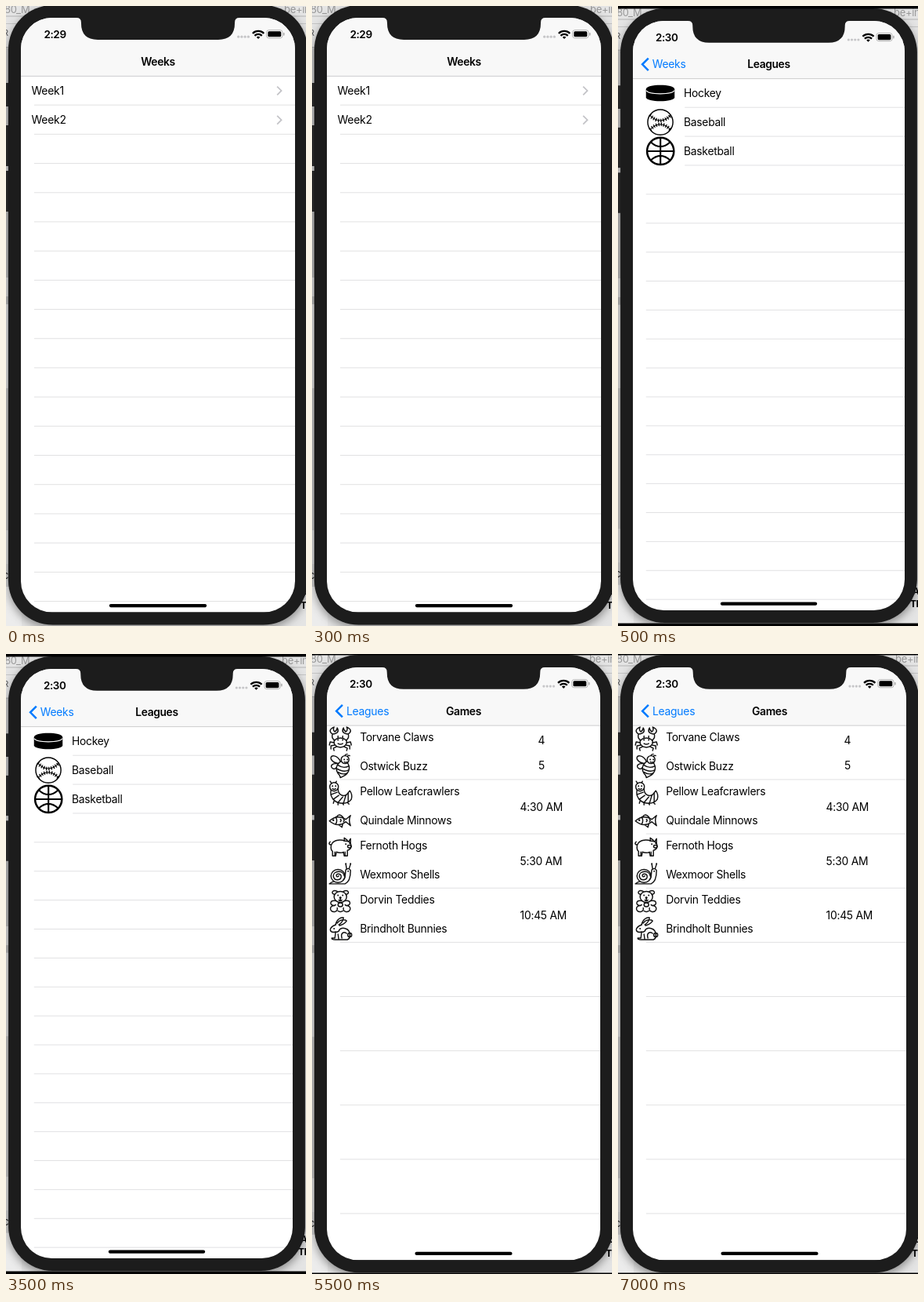
Write an HTML page that moves like this. It is 383x790 px and loops after 8 s.

```html
<!DOCTYPE html>
<html lang="en">
<head>
<meta charset="utf-8">
<title>Weekly games</title>
<style>
  html, body { margin: 0; width: 100%; height: 100%; overflow: hidden; background: #000; }
  svg { display: block; width: 100%; height: 100%; }
  text { font-family: Inter, "Liberation Sans", sans-serif; font-size: 16.5px; letter-spacing: -.3px; }
  .title { font-weight: 600; letter-spacing: -.45px; }
  .icon { fill: none; stroke: #111; stroke-width: 1.45; stroke-linecap: round; stroke-linejoin: round; }
  .icon .dot { fill: #111; stroke: none; }
</style>
</head>
<body>
<svg id="stage" viewBox="0 0 383 790" preserveAspectRatio="none"></svg>
<script>
const LOOP = 8000;
const W = 414, H = 896, NAV = 88, BEZEL = 19;
const BLUE = '#007aff';

const rect = (x, y, w, h, fill, r = 0) =>
  `<rect x="${x}" y="${y}" width="${w}" height="${h}" rx="${r}" fill="${fill}"/>`;
const text = (x, y, s, attrs = '') => `<text x="${x}" y="${y}" ${attrs}>${s}</text>`;
const line = (x, y) => `<path d="M${x} ${y}H${W}" stroke="#e0e0e2" stroke-width="1.15"/>`;
const path = (d, attrs = '') => `<path d="${d}" ${attrs}/>`;
const dot = (x, y, r = 1) => `<circle class="dot" cx="${x}" cy="${y}" r="${r}"/>`;
const ring = (x, y, rx, ry = rx) => `<ellipse cx="${x}" cy="${y}" rx="${rx}" ry="${ry}"/>`;
const both = s => s + `<g transform="scale(-1 1)">${s}</g>`;
const range = (n, fn) => Array.from({ length: n }, (_, i) => fn(i)).join('');

// Desktop window peeking out behind the phone, in stage pixels
function desktop() {
  const strips = [
    [52, 98, '#c6c6c6'], [98, 128, '#2c2c2c'], [128, 152, '#c2c2c2'], [152, 204, '#2c2c2c'],
    [204, 210, '#cfcfcf'], [210, 262, '#2c2c2c'], [262, 346, '#b9b9b9'], [346, 370, '#d8d8d8'],
    [370, 380, '#b8b8b8'], [380, 487, '#dcdcdc'], [487, 668, '#c4c4c4'], [668, 711, '#dadada'],
    [711, 740, '#d0d0d0'], [740, 800, '#ececec']
  ];
  return `<g transform="scale(${W / 350}) translate(-19 -15)">` +
    rect(-10, -10, 410, 820, '#e4e4e4') +
    strips.map(([a, b, c]) => rect(-10, a, 30, b - a, c)).join('') +
    rect(-10, 12.5, 410, 1, '#b4b4b4') + rect(-10, 22, 410, 1, '#c4c4c4') +
    rect(-10, 52, 40, 1, '#aaa') +
    text(-2, 9, '80_M', 'fill="#999" style="font-size:13px"') +
    text(355, 9, 'be+in', 'fill="#999" style="font-size:13px"') +
    text(-4, 38, 'R', 'fill="#555" style="font-size:11px"') +
    text(-4, 730, 'c', 'fill="#222" style="font-size:13px"') +
    text(379, 752, 'A', 'style="font-size:12px;font-weight:700"') +
    text(376, 768, 'TH', 'style="font-size:12px;font-weight:700"') + '</g>';
}

function statusBar(time) {
  return text(51.5, 30.8, time, 'class="title" text-anchor="middle" style="font-size:16px"') +
    range(4, i => `<circle cx="${328.5 + i * 5}" cy="28.6" r="1.9" fill="#c6c6c8"/>`) +
    path('M350 23.6a12 12 0 0 1 17 0M353 27a8 8 0 0 1 11 0', 'fill="none" stroke="#000" stroke-width="2.7"') +
    path('M355.8 29.2a4 4 0 0 1 5.4 0l-2.7 2.8z') +
    `<rect x="371" y="18.6" width="24" height="12" rx="3.4" fill="#fff" stroke="#a5a5a5"/>` +
    rect(373, 20.4, 20, 8.4, '#000', 1.8) +
    rect(396.4, 22.4, 1.6, 4.4, '#a5a5a5', .8);
}

function navBar(title, back) {
  return rect(0, 0, W, NAV, '#f8f8f8') + rect(0, NAV - .6, W, 1, '#c4c4c6') +
    text(W / 2, 72, title, 'class="title" text-anchor="middle"') +
    (back ? path('M23.6 56.8L14.4 66L23.6 75.2', `fill="none" stroke="${BLUE}" stroke-width="3"`) +
      text(29.6, 72, back, `fill="${BLUE}"`) : '');
}

function phone({ top, width, time, title, back, body, bar }, id) {
  const k = width / W;
  return `<g id="${id}">
    <g transform="translate(19 ${top}) scale(${k})">
      ${desktop()}
      <g filter="url(#shade)">${rect(-BEZEL, -BEZEL, W + 2 * BEZEL, H + 2 * BEZEL, '#1c1c1c', 67)}</g>
      <g clip-path="url(#screen)">
        ${rect(0, 0, W, H, '#fff')}${body}${navBar(title, back)}${statusBar(time)}
        ${rect(133.4, 883.6, 147.2, 5, '#000', 2.5)}
        ${path('M84-1H330V0Q323 0 323 7V8Q323 33 298 33H116Q91 33 91 8V7Q91 0 84 0Z', 'fill="#1c1c1c"')}
      </g>
    </g>
    ${rect(0, 0, 383, bar, '#000')}${rect(0, 790 - bar, 383, bar, '#000')}
  </g>`;
}

function weeks() {
  const row = (s, i) => text(16, NAV + 28 + i * 44, s) +
    path(`M387 ${NAV + 15.6 + i * 44}l6.4 6.4l-6.4 6.4`, 'fill="none" stroke="#c4c4c8" stroke-width="2.1"');
  return ['Week1', 'Week2'].map(row).join('') + range(18, i => line(20, NAV + 43.5 + i * 44));
}

function leagues() {
  const puck = path('M20 104C20 95.5 63.5 95.5 63.5 104V116C63.5 124 20 124 20 116Z', 'fill="#000"') +
    path('M20.6 106C24 112.5 59.5 112.5 63 106', 'fill="none" stroke="#fff" stroke-width="1.4"');
  const seams = 'M25.5 143Q41.8 160 58 143M26 165.5Q41.8 149 57.5 165.5';
  const baseball = `<g fill="none" stroke="#000"><circle cx="41.8" cy="154" r="19.2" stroke-width="1.7"/>` +
    path(seams, 'stroke-width="1.2"') +
    path(seams, 'stroke-width="5.4" stroke-dasharray="1.5 2.3"') + '</g>';
  const basketball = `<g fill="none" stroke="#000" stroke-width="2.5"><circle cx="42" cy="198" r="20.4" stroke-width="3"/>` +
    path('M42 178V218M22 198H62M27 184Q42 198 57 184M27 212Q42 198 57 212') + '</g>';
  return puck + baseball + basketball +
    ['Hockey', 'Baseball', 'Basketball'].map((s, i) => text(77.6, NAV + 28 + i * 44, s)).join('') +
    range(18, i => line(i < 3 ? 79 : 20, NAV + 43.5 + i * 44));
}

const crab = path('M-8 2Q0-4 8 2Q9 10 0 11Q-9 10-8 2Z') + dot(-3, 1.5) + dot(3, 1.5) + path('M-3 6Q0 8 3 6') +
  both(path('M-7 2Q-12-1-10-6Q-17-11-8-15Q-10-11-7-9Q-4-11-4-14Q0-7-10-6M-3-.5V-3.5M-8 5L-13 4L-14 8M-7 8L-12 9L-12 13M-5 10L-9 12L-8 15'));

const bee = ring(6, -8, 5) + dot(5, -8) + dot(9, -8) + path('M6-13Q6-15 9-15M9-12Q10-14 12-13M5-5Q7-4 9-5') +
  path('M1-6C-6-2-7 6-1 12L0 15L4 13C12 9 13 1 9-4M-3-1Q4 4 11 0M-5 3Q4 9 11 5M-3 8Q3 12 9 9') +
  path('M0-6C-4-14-13-15-12-9Q-10-4-2-3M-3-3C-10-4-14 0-10 3Q-7 5-5 2');

const caterpillar = ring(-8, -8, 5.5) + dot(-10, -9) + dot(-6, -9) + path('M-10-5.5Q-8-4-6-5.5M-11-12L-13-15M-6-13L-5-15') +
  path('M-3-6C-3 3 4 5 8 2Q10 0 12-3Q16 2 14 8C9 15-2 14-7 10C-12 6-13 1-12-4') +
  path('M-12 2L-4-1M-9 8L-2 3M-3 12L3 5M4 13L7 3M10 11L10 0M-8 10L-9 13M-3 12L-3 15M3 13L4 15M9 12L11 14');

const fish = path('M-14 1Q-4-8 7-1L13-6Q10 0 13 7L7 2Q-3 10-14 1ZM-6-4Q-3 1-6 5M-5-4Q-1-10 4-3M-2 6L2 9L3 5') +
  path('M0-1q2 1 0 3M4-1q2 1 0 3') + dot(-9, 0, 1.2);

const pig = path('M6-8C-1-11-12-9-12 0Q-12 4-10 5L-10 11H-6L-5 6Q0 8 4 6L5 11H9L9 4Q13 3 14-1L13-5Q12-8 6-8Z') +
  path('M5-8L5-12L9-9M11-8L13-11L13-6M-12-3Q-16-4-13-7M6 6V11M-7 6V11') + ring(11.5, -1, 2.2, 1.7) + dot(7, -4) + dot(12, -5);

const snail = path('M-14 12Q-10 9-8 9M-14 12H6C11 10 13 3 13-5Q11-9 7-6C6-2 7 4 4 7M8-7L7-13M11-7L13-13') +
  ring(-3, 2, 9, 8.4) + path('M5 2C4-6-9-5-9 2C-8 9 2 8 1 2C0-2-6-1-5 2Q-4 4-2 2') + dot(7, -13.5) + dot(13, -13.5) + dot(10, -4);

const bear = ring(0, -6, 8, 7) + both(path('M-7-9C-13-10-10-16-4-13') + dot(-3, -8) +
  path('M-6-1C-14-2-14 5-8 5Q-7 5-6 4M-7 5C-15 5-14 14-7 13Q-3 12-4 8')) +
  dot(0, -5, 1.5) + path('M0-4V-2M-2-2Q0 0 2-2M-3 12Q0 14 3 12') + ring(0, 4, 3, 2.5);

const rabbit = path('M-6-5C-5-12 1-15 4-14C4-10 0-6-2-5M-4-7C-1-12 6-12 8-10C6-6 2-5-1-4') +
  path('M-6-5C-12-3-15 2-11 4Q-8 5-6 4L-7 12H-11Q-11 14-7 14H9C14 12 13 2 7 0Q2-2-1 1M-6 4Q-2 5-1 1M2 12C0 6 4 3 8 6M-2 14L-3 7') +
  ring(12, 8, 2.5) + dot(-8, 0);

function games() {
  const teams = [
    ['Torvane Claws', crab], ['Ostwick Buzz', bee],
    ['Pellow Leafcrawlers', caterpillar], ['Quindale Minnows', fish],
    ['Fernoth Hogs', pig], ['Wexmoor Shells', snail],
    ['Dorvin Teddies', bear], ['Brindholt Bunnies', rabbit]
  ];
  const row = ([name, icon], i) => {
    const odd = i % 2, y = NAV + 82 * (i - odd) / 2;
    return `<g class="icon" transform="translate(20.4 ${108 + i * 41}) scale(1.186)">${icon}</g>` +
      text(50, y + 23 + odd * 44, name);
  };
  return teams.map(row).join('') +
    text(325, 116.3, '4', 'text-anchor="middle"') + text(325, 154.4, '5', 'text-anchor="middle"') +
    ['4:30 AM', '5:30 AM', '10:45 AM'].map((s, i) => text(292.4, 216.8 + i * 82, s)).join('') +
    range(9, i => line(20, NAV + 81.6 + i * 82));
}

const scenes = [
  { start: 0, top: 15, width: 350, time: '2:29', title: 'Weeks', body: weeks(), bar: 0 },
  { start: 500, top: 19, width: 347, time: '2:30', title: 'Leagues', back: 'Weeks', body: leagues(), bar: 3.5 },
  { start: 5500, top: 17, width: 349, time: '2:30', title: 'Games', back: 'Leagues', body: games(), bar: 1.5 }
];

const stage = document.getElementById('stage');
stage.innerHTML = `<defs>
  <clipPath id="screen"><rect width="${W}" height="${H}" rx="47"/></clipPath>
  <filter id="shade" x="-10%" y="-10%" width="120%" height="120%">
    <feDropShadow dx="0" dy="5" stdDeviation="7" flood-opacity=".4"/>
  </filter></defs>` + scenes.map((s, i) => phone(s, 'scene' + i)).join('');
const views = scenes.map((_, i) => document.getElementById('scene' + i));

function draw(now) {
  const t = now % LOOP;
  const current = scenes.filter(s => s.start <= t).length - 1;
  views.forEach((v, i) => v.style.display = i === current ? '' : 'none');
}

function tick() {
  draw(performance.now());
  requestAnimationFrame(tick);
}
tick();
</script>
</body>
</html>
```
